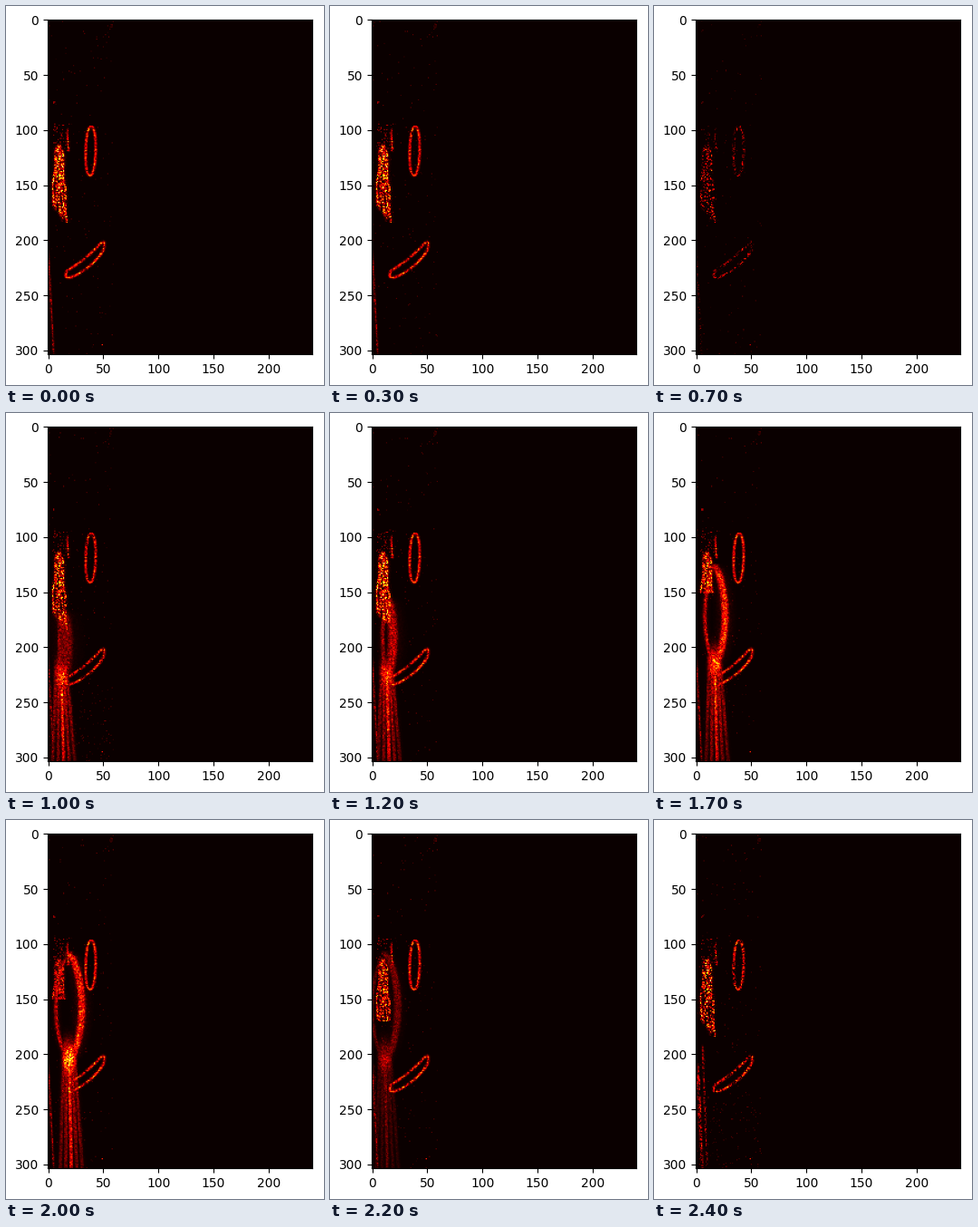
A matplotlib script that plays this animation: 351x418 px, repeating every 2.5 s.

```python
import numpy as np
import matplotlib.pyplot as plt
from matplotlib.animation import FuncAnimation

W, H, DPI = 351, 418, 100
ROWS, COLS, LIVE = 304, 240, 60
FRAMES, STEP = 25, 100

Y, X = np.mgrid[0:ROWS, 0:LIVE].astype(float)
ROW = np.arange(ROWS, dtype=float)


def ease(t, a, b):
    u = np.clip((t - a) / (b - a), 0, 1)
    return u * u * (3 - 2 * u)


def bump(t, centre, width):
    return np.exp(-((t - centre) / width) ** 2)


def spow(v, p):
    return np.sign(v) * np.abs(v) ** p


def along(y0, y1):
    return np.clip((ROW - y0) / (y1 - y0), 0, 1)


def thread(x, y0, y1, w, level):
    """A soft line that runs down the rows, with a faint halo."""
    ends = np.clip((ROW - y0) / 4 + 1, 0, 1) * np.clip((y1 - ROW) / 4 + 1, 0, 1)
    d = np.abs(X - np.reshape(x, (-1, 1))) / w
    return (ends * level)[:, None] * (np.exp(-d ** 4) + .2 * np.exp(-d ** 2 / 4))


def outline(px, py, level, w=1.1):
    """A soft line through many points."""
    img = np.zeros_like(X)
    for x, y in zip(px, py):
        img = np.maximum(img, level * np.exp(-((X - x) ** 2 + (Y - y) ** 2) / w ** 2))
    return img


def speckle(rng, shape):
    return np.clip(rng.gamma(shape, 1 / shape, X.shape), 0, 2.1)


def patch():
    """Broken threads that fan out downwards."""
    img = np.zeros_like(X)
    for i in range(5):
        y1 = 166 + 4.5 * i
        s = along(116, y1)
        x = 9 + .5 * i + (2.6 * i - 5) * np.sqrt(s) + .6 * np.sin(ROW / 5 + 2 * i)
        img = np.maximum(img, thread(x, 116, y1, 1.1, .36))
    return img


def scatter(rng):
    """Dots that flicker in the same places all the time."""
    near = (Y > 94) & (Y < 122) & (X > 3) & (X < 20)
    corner = (X > 55) & (Y < 11)
    odds = .004 + .16 * near + .25 * corner
    dots = (rng.random(X.shape) < odds) * rng.uniform(.04, .14, X.shape) * (1 + near)
    dots[75:77, 5:7] = .24
    dots[295, 49] = .5
    return dots


ANGLE = np.linspace(0, 2 * np.pi, 200)
C, S = np.cos(ANGLE), np.sin(ANGLE)
RING = outline(38.5 + 4.5 * spow(C, .85) - .5 * S, 119.5 + 22 * S, .4)

v = (1 + spow(C, .6)) / 2
BAND = outline(16 + 34.7 * v, 231.5 - 12 * v - 15 * v ** 2
               + (4.2 + 1.8 * v) * spow(S, .5), .44 - .06 * v.mean())

base = np.random.default_rng(7)
FIXED, ROUGH = speckle(base, 2.8), speckle(base, 1.2)
PATCH = patch() * ROUGH
DOTS = scatter(base)
EDGE = np.maximum(thread((ROW - 212) * .055, 212, 303, .8, .15),
                  thread(18 + .5 * np.sin(ROW / 6), 102, 117, .8, .28))
TRAIL = np.maximum(thread(2 + (ROW - 212) * .04, 212, 303, .8, .24),
                   thread(6 + (ROW - 195) * .035, 195, 303, .8, .17))


def body(u, knot_x, knot_y):
    """Two bows above a bright knot and a fan of legs below it."""
    top = 170 - 60 * u
    s = along(top, knot_y)
    mid = knot_x + s * 0
    bow = np.sin(np.pi * s) ** .6
    glow = ease(u, 0, .5)
    parts = [
        thread(mid + (4 + 7.5 * u) * bow, top, knot_y, 3.2 + 2.8 * (1 - u) ** 4,
               .15 + .17 * glow),
        thread(mid - (2 + 10 * u) * bow, top + 5, knot_y, 1.7, .16 + .06 * glow),
        (.42 + .2 * u ** 3) * np.exp(-((X - knot_x) / 6) ** 4
                                     - ((Y - knot_y) / 14) ** 2)]
    fall = along(knot_y, ROWS)
    for off in np.linspace(-1, 1, 5):
        x = knot_x + off * (5 + 5 * fall) + 2 * fall
        level = (.17 + .24 * bump(off, 0, .4)) * (1 - .45 * fall)
        parts.append(thread(x, knot_y, ROWS, 1.5, level))
    return np.max(parts, axis=0)


def picture(k):
    t = k * STEP
    rng = np.random.default_rng(100 + k)
    u = np.clip((t - 1000) / 1000, 0, 1)
    here = ease(t, 700, 1000) * (1 - ease(t, 2000, 2350))
    knot_x, knot_y = 12 + 7 * u - 12 * (1 - here), 226 - 21 * u ** 2

    lull, late = bump(t, 700, 220), bump(t, 2400, 150)
    gain = 1 - .35 * lull
    keep = 1 - .6 * lull - .28 * late

    still = np.maximum(RING, BAND * (X >= here * (knot_x + 4))) * (.75 * FIXED + .25 * speckle(rng, 3))
    cut = 184 - 34 * here * ease(u, 0, .8)
    still = np.maximum(still, PATCH * (Y <= cut) * (1 - .4 * here * u ** 3))
    still = np.maximum(still, np.maximum(EDGE, TRAIL * late) * FIXED)
    img = still * gain * (rng.random(X.shape) < keep)
    img = np.maximum(img, DOTS * gain * (rng.random(X.shape) < .8 * keep))

    if here > 0:
        grain = .5 * FIXED + .5 * speckle(rng, 4)
        img = np.maximum(img, here * body(u, knot_x, knot_y) * grain)

    odds = .004 + .025 * (Y > 235) * (bump(t, 1000, 120) + late)
    img += (rng.random(X.shape) < odds) * rng.uniform(.03, .13, X.shape)

    full = np.zeros((ROWS, COLS))
    full[:, :LIVE] = np.clip(img, 0, 1)
    return full


fig = plt.figure(figsize=(W / DPI, H / DPI), dpi=DPI, facecolor="white")
height = 369.6
width = height * COLS / ROWS
ax = fig.add_axes([45.97 / W, 33.78 / H, width / W, height / H])
view = ax.imshow(picture(0), cmap="hot", vmin=0, vmax=1, aspect="auto")


def update(k):
    view.set_data(picture(k))
    return [view]


anim = FuncAnimation(fig, update, frames=FRAMES, interval=STEP, repeat=True,
                     repeat_delay=0, blit=False)
plt.show()
```
